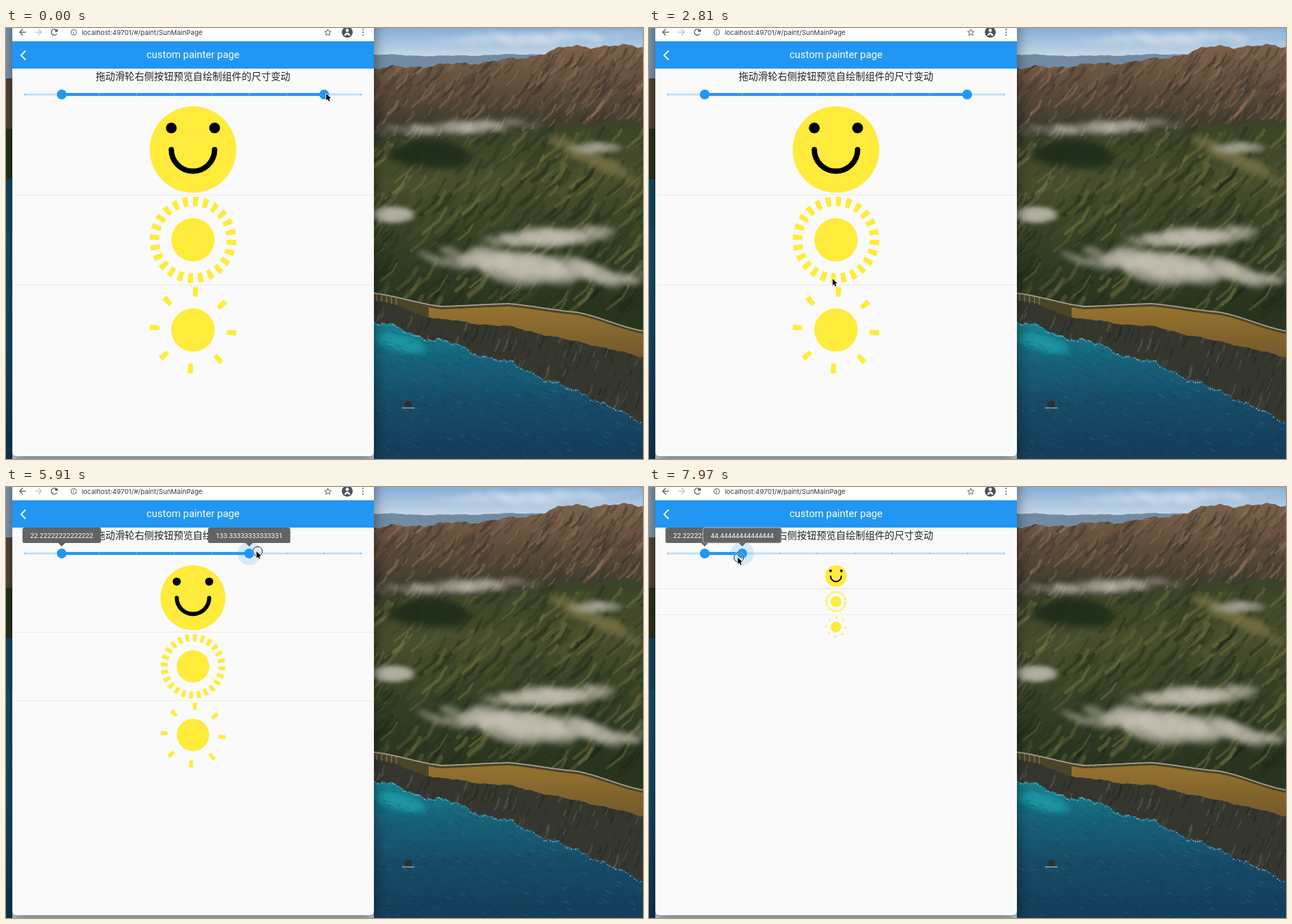
Recreate the animation shown at these times as an HTML page with a canvas. Size 909 px wide and 616 px high, loop 8 s.

```html
<!DOCTYPE html>
<html lang="zh">
<head>
<meta charset="utf-8">
<style>
html, body { margin: 0; width: 100%; height: 100%; overflow: hidden; }
canvas { display: block; }
</style>
</head>
<body>
<canvas id="stage" width="909" height="616"></canvas>
<script>
const W = 909, H = 616, LOOP = 8000, STEP = 147.6;
const BLUE = '#2196f3', YELLOW = '#ffeb3b', GREY = '#5f6368', TAU = Math.PI * 2;
const U = 0.695;                       // stage pixels per layout unit
const TRACK_X = 26, TRACK_W = 481.5, TRACK_Y = 95, MID = 266.8;
const PAGE_X = 9, PAGE_W = 516, SHORE = PAGE_X + PAGE_W;

let ctx = document.getElementById('stage').getContext('2d');

let seed = 7;
const rnd = () => (seed = seed * 16807 % 2147483647) / 2147483647;
const between = (a, b) => a + (b - a) * rnd();
const mix = (a, b, f) => a + (b - a) * f;

function disc(x, y, r, color) {
  ctx.fillStyle = color;
  ctx.beginPath();
  ctx.arc(x, y, r, 0, TAU);
  ctx.fill();
}

function arc(x, y, r, from, to, color, width) {
  ctx.strokeStyle = color;
  ctx.lineWidth = width;
  ctx.beginPath();
  ctx.arc(x, y, r, from, to);
  ctx.stroke();
}

function line(color, width, ...pts) {
  ctx.strokeStyle = color;
  ctx.lineWidth = width;
  ctx.beginPath();
  for (let i = 0; i < pts.length; i += 2) ctx.lineTo(pts[i], pts[i + 1]);
  ctx.stroke();
}

function rect(x, y, w, h, color) {
  ctx.fillStyle = color;
  ctx.fillRect(x, y, w, h);
}

function text(str, x, y, font, color, align = 'center') {
  ctx.font = font;
  ctx.fillStyle = color;
  ctx.textAlign = align;
  ctx.fillText(str, x, y);
}

function vertical(y0, y1, ...colors) {
  const g = ctx.createLinearGradient(0, y0, 0, y1);
  colors.forEach((c, i) => g.addColorStop(i / (colors.length - 1), c));
  return g;
}

// Height line through evenly spaced levels, roughened by a few waves
function ridge(levels, rough = 0) {
  return x => {
    const u = Math.min(0.999, Math.max(0, (x - SHORE) / (W - SHORE))) * (levels.length - 1);
    const i = Math.floor(u), f = u - i, s = f * f * (3 - 2 * f);
    const waves = Math.sin(x / 13) + 0.6 * Math.sin(x / 5.3 + 1) + 0.3 * Math.sin(x / 2.1);
    return mix(levels[i], levels[i + 1], mix(f, s, 0.4)) + rough * waves;
  };
}

// Area between two height lines
function area(top, bottom, from = SHORE) {
  const p = new Path2D();
  for (let x = from; x <= W; x++) p.lineTo(x, top(x));
  for (let x = W; x >= from; x--) p.lineTo(x, bottom(x));
  return p;
}

// Seeded slanting streaks, scattered inside an area
function streaks(path, y0, y1, count, shades, size, lean) {
  ctx.save();
  ctx.clip(path);
  ctx.lineCap = 'round';
  for (let i = 0; i < count; i++) {
    const x = between(SHORE, W + 20), y = between(y0, y1), len = size * between(0.4, 1.3);
    ctx.globalAlpha = between(0.15, 0.5);
    line(shades[i % shades.length], size * between(0.08, 0.22),
      x, y, x + lean * len * 0.3, y + len * 0.5, x + lean * len, y + len);
  }
  ctx.restore();
}

// Bank of soft blobs between two points
function mist(color, x0, y0, x1, y1, size) {
  ctx.save();
  ctx.filter = 'blur(4px)';
  ctx.globalAlpha = 0.5;
  ctx.fillStyle = color;
  for (let i = 0; i < 26; i++) {
    const f = i / 25, r = size * (0.3 + Math.sin(f * Math.PI)) * between(0.5, 1);
    ctx.beginPath();
    ctx.ellipse(mix(x0, x1, f), mix(y0, y1, f) + between(-0.5, 0.5) * size, r * 1.7, r * 0.7, 0.25, 0, TAU);
    ctx.fill();
  }
  ctx.restore();
}

function landscape() {
  const floor = () => H;
  const far = ridge([38, 40, 38, 36, 36], 0.6);
  const brown = ridge([58, 53, 46, 26, 26], 2);
  const green = ridge([160, 157, 148, 137, 132], 2.5);
  const road = ridge([379, 398, 394, 406, 433]);
  const meadow = ridge([388, 417, 427, 448, 470], 1);
  const sea = ridge([420, 447, 478, 518, 562], 2.5);

  rect(0, 0, W, H, vertical(0, 40, '#86aed7', '#c6d7e6'));
  mist('#dfe8f0', 600, 18, W, 10, 8);
  const layer = (path, fill) => {
    ctx.fillStyle = fill;
    ctx.fill(path);
    return path;
  };
  layer(area(far, floor), '#728ba3');
  const upper = layer(area(brown, floor), vertical(30, 150, '#7a604a', '#5d4b39', '#38392b'));
  streaks(upper, 25, 150, 420, ['#332f2b', '#94735a', '#403a30'], 20, -0.8);

  const lower = layer(area(green, floor), vertical(135, 400, '#3b4428', '#474d2c', '#333f24', '#29341f'));
  streaks(lower, 140, 390, 480, ['#1a2618', '#7a7846', '#24311d', '#4c552e'], 30, -0.9);
  mist('#22301e', 550, 180, 660, 180, 18);
  mist('#787347', 765, 150, W, 225, 10);

  mist('#c9c5ba', 530, 148, 760, 137, 9);
  mist('#b5b3a5', 800, 172, 880, 170, 6);
  mist('#b5b3a5', SHORE, 268, 580, 268, 9);
  mist('#c8c2b5', 595, 322, W, 362, 22);
  mist('#c8c2b5', 680, 304, 870, 292, 13);

  layer(area(road, floor), '#4a4527');
  layer(area(x => road(x) + 4, meadow, 603), vertical(400, 470, '#96722f', '#735a2b'));
  const cliff = layer(area(meadow, sea), '#35372f');
  streaks(cliff, 385, 560, 420, ['#191f20', '#6f6a5c', '#272b29'], 16, -0.4);

  const water = layer(area(sea, floor), vertical(420, 600, '#17818f', '#175f77', '#174a66', '#133f5a'));
  mist('#1f98a4', 525, 440, 600, 462, 10);
  streaks(water, 430, H, 1100, ['#5490a5', '#0a2c47', '#0e3c56'], 4, 2);
  for (let x = SHORE; x < W; x += 3) disc(x, sea(x) + between(0, 3), between(0.5, 1.3), 'rgba(185,205,205,.6)');

  for (let x = SHORE; x < W; x += 2) line('#aaa292', 1.8, x, road(x), x + 2, road(x + 2));
  for (let x = 529; x < 560; x += 7) line('#8f8877', 1, x, road(x), x, road(x) + 11);
  disc(574, 538, 5.5, '#2c302f');
  line('#a9c0c5', 1.2, 565, 543, 583, 543);

  const strip = ['#7f9cb8', '#54473a', '#28321f', '#154a62'];
  strip.forEach((c, i) => rect(0, i * 72, PAGE_X, H, c));
  rect(0, 290, PAGE_X, H, vertical(290, H, '#14536b', '#14496a', '#103450'));
}

function toolbar() {
  rect(PAGE_X, 0, PAGE_W, 19, '#fff');
  const arrow = (x, d, color) => {
    line(color, 1.4, x - 4.5 * d, 6, x + 4.5 * d, 6);
    line(color, 1.4, x, 1.5, x + 4.5 * d, 6, x, 10.5);
  };
  arrow(24, -1, GREY);
  arrow(46, 1, '#c4c6c8');
  arc(69, 6, 4.2, 0.5, TAU - 0.7, GREY, 1.4);
  rect(70, 2, 4, 3.5, GREY);

  arc(96.7, 6.2, 4, 0, TAU, GREY, 1);
  line(GREY, 1, 96.7, 5.5, 96.7, 8.5);
  line(GREY, 1, 96.7, 3.8, 96.7, 4.8);
  text('localhost:49701/#/paint/SunMainPage', 108, 9.6, '9.6px Inter, sans-serif', '#37393c', 'left');

  const star = [];
  for (let i = 0; i <= 10; i++) {
    const r = i % 2 ? 2.2 : 4.9, a = i * Math.PI / 5;
    star.push(459.3 + r * Math.sin(a), 6.6 - r * Math.cos(a));
  }
  line(GREY, 1, ...star);

  disc(487, 6, 7.8, '#47525d');
  disc(487, 3.4, 2.3, '#fff');
  arc(487, 11, 3, Math.PI, TAU, '#fff', 2.5);
  for (let y = 2; y < 12; y += 4) disc(509.5, y, 1.1, GREY);
}

function scenery() {
  const layer = document.createElement('canvas'), main = ctx;
  layer.width = W;
  layer.height = H;
  ctx = layer.getContext('2d');
  landscape();

  ctx.save();
  ctx.shadowColor = 'rgba(0,0,0,.5)';
  ctx.shadowBlur = 20;
  ctx.shadowOffsetY = 6;
  ctx.fillStyle = '#fafafa';
  ctx.beginPath();
  ctx.roundRect(PAGE_X, -20, PAGE_W, 632, 6);
  ctx.fill();
  ctx.restore();

  toolbar();
  rect(PAGE_X, 19, PAGE_W, 39, BLUE);
  line('#fff', 1.8, 28, 32.5, 21.5, 39, 28, 45.5);
  text('custom painter page', MID, 43, '14.5px Roboto, sans-serif', '#fff');
  text('拖动滑轮右侧按钮预览自绘制组件的尺寸变动', MID, 74,
    '13.9px "Noto Sans CJK SC", "Noto Sans CJK", sans-serif', '#222');
  ctx = main;
  return layer;
}

function face(y, d) {
  const q = d / 4;
  disc(MID, y, d / 2, YELLOW);
  for (const side of [-q, q]) disc(MID + side, y - q, d / 16, '#000');
  ctx.lineCap = 'round';
  arc(MID, y, q, 0, Math.PI, '#000', d / 16);
  ctx.lineCap = 'butt';
}

function sun(y, d, rays) {
  disc(MID, y, d / 4, YELLOW);
  for (let i = 0; i < rays; i++) {
    const a = i * TAU / rays;
    arc(MID, y, d * 4 / 9, a, a + TAU / 48, YELLOW, d / 9);
  }
}

function shapes(value) {
  const d = value * U, pitch = d + 5.4, y = 112 + d / 2;
  face(y, d);
  sun(y + pitch, d, 24);
  sun(y + 2 * pitch, d, 8);
  for (const n of [1, 2]) rect(PAGE_X, Math.round(109 + n * pitch), PAGE_W, 1, '#ebebeb');
}

const stopX = n => TRACK_X + TRACK_W * n / 9;

function slider(left, right, halo) {
  rect(TRACK_X, TRACK_Y - 1.4, TRACK_W, 2.8, '#bbdffb');
  rect(left, TRACK_Y - 2.1, right - left, 4.2, BLUE);
  for (let n = 0; n <= 9; n++) {
    const x = stopX(n), active = x > left && x < right;
    disc(Math.min(Math.max(x, 27), 507), TRACK_Y, 0.8, active ? '#b9dcfa' : BLUE);
  }
  disc(right, TRACK_Y, 16.7 * halo, 'rgba(33,150,243,.16)');
  for (const x of [left, right]) disc(x, TRACK_Y, 6.95, BLUE);
}

function bubble(x, n, scale, outlined) {
  const str = String(n / 9 * 200), font = '9.73px Roboto, sans-serif';
  ctx.font = font;
  const half = ctx.measureText(str).width / 2 + 11;
  ctx.save();
  ctx.translate(x, 85);
  ctx.scale(scale, scale);
  ctx.fillStyle = '#636363';
  ctx.beginPath();
  ctx.roundRect(-half, -27, half * 2, 22, 2.8);
  ctx.fill();
  if (outlined) {
    ctx.strokeStyle = '#c8c8c8';
    ctx.lineWidth = 0.8;
    ctx.stroke();
  }
  ctx.fillStyle = '#636363';
  ctx.fill(new Path2D('M-5.5-5.5h11L0 0z'));
  text(str, 0, -12.5, font, '#fff');
  ctx.restore();
}

const ARROW = new Path2D('M0 0v9.4l2.2-2 1.5 3.4 1.6-.7-1.5-3.3 2.9-.2z');

function pointer(x, y, pressed) {
  if (pressed) {
    arc(x + 1.5, y, 6.8, 0, TAU, 'rgba(255,255,255,.75)', 2.4);
    arc(x + 1.5, y, 6.8, 0, TAU, '#111', 1);
  }
  ctx.save();
  ctx.translate(x, y);
  ctx.lineJoin = 'round';
  ctx.strokeStyle = '#fff';
  ctx.lineWidth = 1.5;
  ctx.stroke(ARROW);
  ctx.fillStyle = '#000';
  ctx.fill(ARROW);
  ctx.restore();
}

// Pointer path: tick, x, y
const PATH = [
  [0, 457, 94], [3, 457, 94], [8, 236, 146], [13, 236, 146], [16, 253, 207], [20, 265, 409],
  [24, 454, 89], [28, 454, 89], [34, 434, 87], [35, 416.5, 88], [40, 357.5, 92], [44, 225, 95],
  [47, 159.5, 98], [55, 122, 101]
];
const GRAB = 26;

function pointerAt(tick) {
  const i = PATH.findIndex(p => p[0] > tick), [t0, x0, y0] = PATH[i - 1], [t1, x1, y1] = PATH[i];
  const f = (tick - t0) / (t1 - t0);
  return [mix(x0, x1, f), mix(y0, y1, f)];
}

const stopAt = tick => tick < GRAB ? 8 : Math.round((pointerAt(tick)[0] + 1.5 - TRACK_X) / TRACK_W * 9);

function draw(time) {
  const tick = Math.floor((time + 4) / STEP), during = (a, b) => tick >= a && tick <= b;
  const stop = stopAt(tick), before = stopAt(Math.max(0, tick - 1));
  const left = stopX(1), right = stopX(mix(before, stop, stop === before ? 1 : 0.11));
  const grow = tick === GRAB ? 0.05 : during(1, 4) || tick > GRAB ? 1 : 0;
  const pressed = during(1, 2) || during(11, 13) || tick >= GRAB;

  ctx.drawImage(backdrop, 0, 0);
  shapes(stop / 9 * 200);
  slider(left, right, Math.sqrt(grow));
  if (grow) {
    bubble(left, 1, grow);
    bubble(right, stop, grow, right - left < 112);
  }
  pointer(...pointerAt(tick), pressed);
}

const backdrop = scenery();
const start = performance.now();
function loop() {
  draw((performance.now() - start) % LOOP);
  requestAnimationFrame(loop);
}
loop();
</script>
</body>
</html>
```
